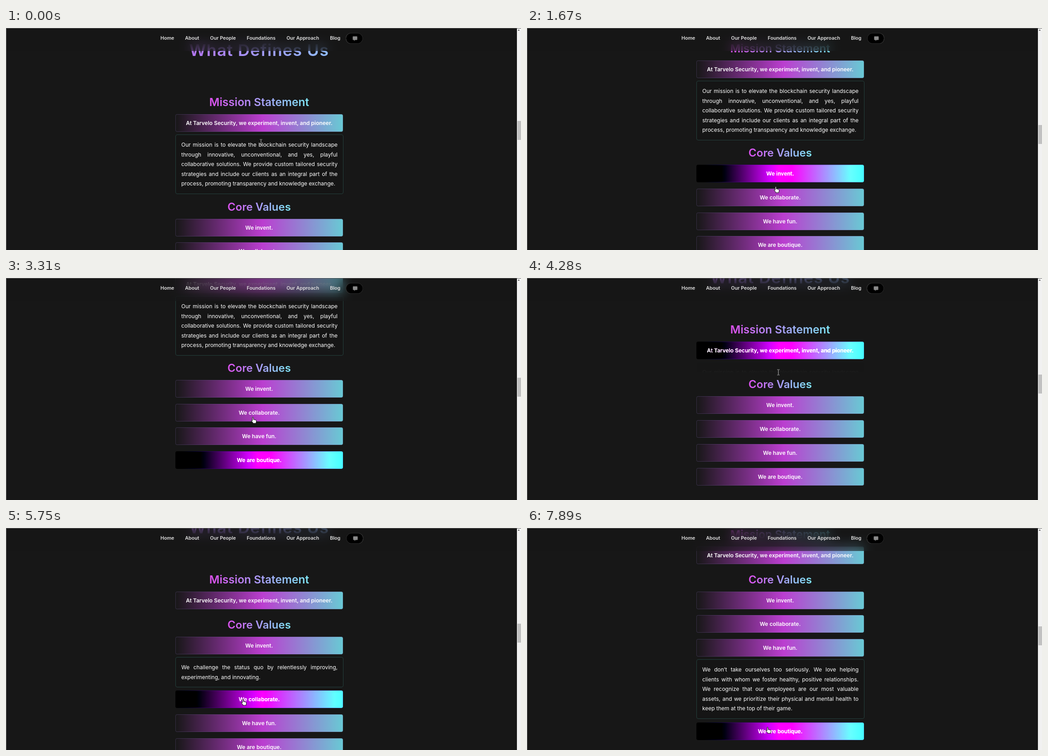
An HTML page that plays this animation: 1137 px wide and 492 px high, repeating every 8 s.

```html
<!DOCTYPE html>
<html lang="en">
<head>
<meta charset="utf-8">
<title>Mission and values</title>
<style>
  html, body { margin: 0; width: 100%; height: 100%; overflow: hidden; background: #171717; }
  body { position: relative; font: 12px/21.6px Inter, sans-serif; color: #fff; }
  body * { box-sizing: border-box; }
  #page, #page > *, header, header > *, #cursor, .edge, #track, #thumb { position: absolute; left: 0; top: 0; }
  #page { right: 0; bottom: 0; overflow: hidden; background: #171717; }
  .title { width: 1118px; text-align: center; font-weight: 600; font-size: 24px; line-height: 39px; }
  .title span { display: inline-block; color: transparent; background: linear-gradient(90deg, #dc4fee, #a99bf6 50%, #7ee6f6); -webkit-background-clip: text; background-clip: text; }
  .title.wide { font-size: 24.5px; }
  .title.big { font-size: 36px; letter-spacing: 1.2px; line-height: 50px; }
  .title.big span { background-image: linear-gradient(90deg, #b475f2, #90bcfc); }
  #page > .bar, #page > .panel { left: 374px; border-radius: 4px; }
  .bar { width: 370px; height: 39px; border: 1px solid rgba(110, 90, 150, .35); text-align: center; font-weight: 600; line-height: 37.5px;
    background: linear-gradient(90deg, #171717, #bb3ed0 52%, #68cad4) border-box; }
  .panel { width: 371px; padding: 11px 12px; border: 1px solid #24403d; background: #151515; overflow: hidden; }
  .panel div { height: 21.6px; text-align: justify; text-align-last: justify; }
  .panel div:last-child { text-align-last: left; }
  header { width: 1128px; height: 51px; background: rgba(23, 23, 23, .45); backdrop-filter: blur(13px); }
  header > nav { left: 341px; top: 11.6px; display: flex; gap: 24px; font-size: 10.67px; font-weight: 600; color: #e2e2e2; white-space: nowrap; }
  header > #chat { left: 750px; top: 11px; width: 38px; height: 24px; border-radius: 12px; background: #000; }
  #chat svg { position: absolute; left: 15px; top: 7px; }
  .edge { background: #666; }
  #track { left: auto; right: 0; width: 9px; height: 100%; background: #f1f1f1; }
  #track::before { content: ""; position: absolute; left: 2px; top: 3px; border: 2.5px solid transparent; border-top: 0; border-bottom: 3px solid #505050; }
  #thumb { left: auto; right: 0; width: 8px; height: 42px; background: #c1c1c1; }
  #cursor { overflow: visible; }
</style>
</head>
<body>
<div id="page"></div>
<header>
  <nav><a>Home</a><a>About</a><a>Our People</a><a>Foundations</a><a>Our Approach</a><a>Blog</a></nav>
  <div id="chat"><svg width="11" height="11"><path d="M1.5.5h8q1 0 1 1v6q0 1-1 1H6l-2.500 2v-2h-2q-1 0-1-1v-6q0-1 1-1z" fill="#8a8a8a"/></svg></div>
</header>
<div id="track"></div><div id="thumb"></div>
<div class="edge" style="width:100%;height:1px"></div>
<div class="edge" style="width:1px;height:100%"></div>
<svg id="cursor" width="1" height="1">
  <path id="text" d="M-2.500-6h2M.5-6h2M-2.500 6h2M.5 6h2M0-5.500v11" stroke="#ccc" fill="none"/>
  <path id="hand" d="M-1 1Q0-.8 1.200 1V5.500L6 6.500Q8 7 7.800 9L7 12.500V14H0V12.500L-3.800 8Q-3.600 6.300-1 8.500Z" fill="#fff" stroke="#111"/>
  <path id="arrow" d="M0 0V10.500L2.400 8.300 4 12 5.800 11.200 4.200 7.700H7.500Z" fill="#fff" stroke="#111" stroke-width=".7"/>
</svg>
<script>
const $ = id => document.getElementById(id);
const add = (cls, html) => {
  const el = document.createElement('div');
  el.className = cls;
  el.innerHTML = html;
  return $('page').appendChild(el);
};
const moveY = (el, y) => el.style.transform = `translateY(${Math.round(y)}px)`;

const items = [
  ['At Tarvelo Security, we experiment, invent, and pioneer.',
    'Our mission is to elevate the blockchain security landscape', 'through innovative, unconventional, and yes, playful',
    'collaborative solutions. We provide custom tailored security', 'strategies and include our clients as an integral part of the',
    'process, promoting transparency and knowledge exchange.'],
  ['We invent.', 'We challenge the status quo by relentlessly improving,', 'experimenting, and innovating.'],
  ['We collaborate.',
    'We work side by side with our clients and treat every', 'project as a shared effort. We listen, exchange ideas,',
    'and build on the strengths of each person, so that we', 'reach better results together.'],
  ['We have fun.',
    'We don’t take ourselves too seriously. We love helping', 'clients with whom we foster healthy, positive relationships.',
    'We recognize that our employees are our most valuable', 'assets, and we prioritize their physical and mental health to',
    'keep them at the top of their game.'],
  ['We are boutique.']
].map(([label, ...lines]) => ({
  panel: add('panel', lines.map(line => `<div>${line}</div>`).join('')),
  bar: add('bar', label),
  full: lines.length * 21.6 + 24
}));
const title = (text, cls = '') => add('title ' + cls, `<span>${text}</span>`);
const hero = title('What Defines Us', 'big'), mission = title('Mission Statement', 'wide'), core = title('Core Values');

const NOTCH = 50, BAR = 39, PANEL = 45.5, TOGGLE = 300, GLIDE = 150;
// Wheel turns: start, duration, notches
const wheel = [[690, 280, 2], [1543, 670, 4], [3050, 590, -5], [6450, 300, 1], [7180, 170, 1]];
// Clicks: time, item that is open afterwards (-1 for none)
const clicks = [[-TOGGLE, 0], [4146, -1], [4900, 1], [5860, 2], [6961, 3], [Infinity, -1]];
// Pointer stops: arrival, x, y
const stops = [[0, 563, 253], [260, 549, 214], [1300, 549, 351], [2620, 545, 308], [4110, 550, 150],
  [4280, 555, 209], [4700, 547, 257], [5620, 523, 379], [6300, 528, 428], [7780, 531, 441]];

const clamp = x => Math.min(1, Math.max(0, x));
const smooth = x => x * x * (3 - 2 * x);
const easeOut = x => 1 - (1 - x) ** 3;

function layout(t, wheelEase, panelEase) {
  const scroll = wheel.reduce((sum, [start, time, n]) => sum + n * NOTCH * wheelEase(clamp((t - start) / time)), 0);
  const toggled = k => panelEase(clamp((t - clicks[k][0]) / TOGGLE));
  let y = 190.8 - scroll;
  const rows = items.map(({ full }, i) => {
    const open = clicks.reduce((sum, c, k) => c[1] === i ? sum + toggled(k) - toggled(k + 1) : sum, 0);
    const row = { y, open, height: open * full };
    y += (i ? 52.7 : 99.7) + row.height;
    return row;
  });
  return { scroll, rows };
}

function pointer(t) {
  const [x0, ...rest] = stops;
  return rest.reduce(([x, y], [end, x1, y1]) => {
    const p = smooth(clamp((t - end) / GLIDE + 1));
    return [x + (x1 - x) * p, y + (y1 - y) * p];
  }, x0.slice(1));
}

// Hit tests ignore wheel turns and toggles that are still under way
function hit(t) {
  const y = pointer(t)[1], inside = (top, height) => y >= top && y <= top + height;
  const { rows } = layout(t, Math.floor, Math.floor);
  return {
    bar: rows.findIndex(r => inside(r.y, BAR)),
    text: rows.some(r => inside(r.y + PANEL, r.height))
  };
}

function draw(t) {
  const { scroll, rows } = layout(t, smooth, easeOut);
  const current = clicks.findLast(c => c[0] <= t)[1];
  const recent = Array.from({ length: 8 }, (_, k) => hit(t - 80 - k * 15).bar);

  moveY(hero, 24 - scroll);
  moveY(mission, rows[0].y - 46);
  moveY(core, rows[1].y - 46);
  items.forEach(({ bar, panel }, i) => {
    const { y, open, height } = rows[i];
    const hover = recent.filter(b => b === i).length / recent.length;
    moveY(bar, y);
    bar.style.filter = `contrast(${1 + 1.5 * hover})`;
    moveY(panel, y + PANEL);
    panel.style.height = height + 'px';
    panel.style.opacity = i === current ? 1 : open * open;
    panel.style.display = open > .01 ? '' : 'none';
  });
  const pageHeight = rows.reduce((sum, r) => sum + r.height, 6098);
  moveY($('thumb'), 9 + 480 * (2558 + scroll) / pageHeight);

  const side = Math.cos(t * Math.PI / 2000);
  $('chat').style.transform = `translateX(${(1 - side) / 2}px)`;
  $('chat').style.boxShadow = `inset 0 0 0 1px #2b2b2b, inset ${side}px 0 0 #666`;

  const [x, y] = pointer(t), over = hit(t);
  $('cursor').style.transform = `translate(${x}px, ${y}px)`;
  const shape = over.bar >= 0 ? 'hand' : over.text ? 'text' : 'arrow';
  for (const id of ['text', 'hand', 'arrow']) $(id).style.display = id === shape ? '' : 'none';
}

const start = performance.now();
(function loop() {
  draw((performance.now() - start) % 8000);
  requestAnimationFrame(loop);
})();
</script>
</body>
</html>
```
